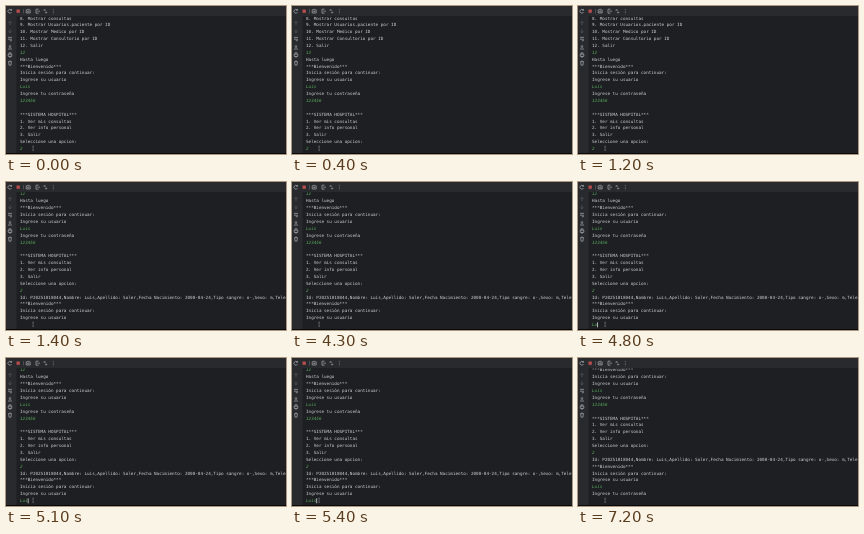
Write an HTML page that moves like this. It is 280x148 px and loops after 8 s.

```html
<!DOCTYPE html>
<html lang="es">
<head>
<meta charset="utf-8">
<title>Consola</title>
<style>
html, body { margin: 0; width: 100%; height: 100%; overflow: hidden; background: #1e1f22; }
svg { display: block; width: 280px; height: 148px; }
text { font: 4.29px "DejaVu Sans Mono", "Liberation Mono", monospace; fill: #cfd1d5; white-space: pre; text-rendering: geometricPrecision; }
.in { fill: #5aac5e; font-style: italic; }
.icon { fill: none; stroke: #a9acb2; stroke-width: .7; }
.dim { stroke: #5a5d63; }
</style>
</head>
<body>
<svg viewBox="0 0 280 148">
  <defs><clipPath id="pane"><rect x="11" y="10.5" width="269" height="136.5"/></clipPath></defs>
  <rect width="280" height="148" fill="#282a2e"/>
  <rect x="10.5" y="10" width="269.5" height="138" fill="#1e1f22"/>
  <g class="icon">
    <path d="M5.3 4A1.9 1.9 0 1 0 5.6 6M5.6 2.9V4.3H4.2"/>
    <rect x="10.9" y="3.9" width="2.6" height="2.6" fill="#b84d4d" stroke="#b84d4d"/>
    <path class="dim" d="M17.5 3V7.5"/>
    <path d="M20.2 3.9H21.2L21.7 3.2H22.7L23.2 3.9H24.2V7H20.2Z"/>
    <circle cx="22.2" cy="5.4" r=".6"/>
    <path d="M32.5 3.2H30V7.2H32.5M31.3 5.2H34"/>
    <path d="M37.5 4.2H39.5L38.5 3.2M39 6.3H41L40 7.3"/>
    <path d="M47.3 3.2V3.9M47.3 4.9V5.6M47.3 6.6V7.3"/>
    <path class="dim" d="M4 19V15.4M2.6 16.8L4 15.4L5.4 16.8"/>
    <path class="dim" d="M4 23.2V26.8M2.6 25.4L4 26.8L5.4 25.4"/>
    <path d="M2 31.4H6M2 33.2H5.2Q6.2 34 5.2 34.8H3.8"/>
    <path d="M2 43H6M4 38.8V41.6M2.8 40.4L4 41.6L5.2 40.4"/>
    <path d="M2.2 48.2H5.8V50.4H2.2ZM3 48V46.8H5V48M3 51H5"/>
    <path d="M2.2 55.6H5.8M2.7 56L3 59.2H5L5.3 56M3.4 54.9H4.6"/>
  </g>
  <g clip-path="url(#pane)"><g id="log"></g></g>
  <rect id="caret" y="140.3" width=".8" height="5" fill="#d6d8dc"/>
  <path d="M26.4 140.2H27.8M27.1 140.2V144.4M26.4 144.4H27.8" fill="none" stroke="#a2a4a9" stroke-width=".45"/>
  <rect y="147" width="280" height="1" fill="#08090a"/>
</svg>
<script>
const LOOP = 8000, LEFT = 14, TOP = 13.5, PITCH = 6.87, ADVANCE = 2.583, ROWS = 20;
const USER = "Luis";
const log = document.getElementById("log"), caret = document.getElementById("caret");

// A leading ">" marks what the user typed.
const login = ["***Bienvenido***", "Inicia sesión para continuar:", "Ingrese su usuario"];
const lines = [
  "8. Mostrar consultas",
  "9. Mostrar Usuarios.paciente por ID",
  "10. Mostrar Medico por ID",
  "11. Mostrar Consultorio por ID",
  "12. Salir",
  ">12",
  "Hasta luego",
  ...login,
  ">" + USER,
  "Ingrese tu contraseña",
  ">123456",
  "",
  "***SISTEMA HOSPITAL***",
  "1. Ver mis consultas",
  "2. Ver info personal",
  "3. Salir",
  "Seleccione una opcion:",
  ">2",
  "Id: P20251018044,Nombre: " + USER + ",Apellido: Soler,Fecha Nacimiento: 2000-04-24,Tipo sangre: o-,Sexo: m,Telefono: 555",
  ...login,
  ">" + USER,
  "Ingrese tu contraseña",
  ">"
];

// [time, first visible line, typed characters, caret shown]
const steps = [
  [0, 0, 1, false],
  [1400, 5, 0, false],
  [4400, 5, 1, false],
  [4800, 5, 2, true],
  [5100, 5, 3, true],
  [5200, 5, 4, false],
  [5400, 5, 4, true],
  [7200, 7, 0, false]
];

const rows = lines.map((line, i) => {
  const el = document.createElementNS("http://www.w3.org/2000/svg", "text");
  const typed = line[0] === ">";
  if (typed) el.setAttribute("class", "in");
  el.setAttribute("x", LEFT);
  el.setAttribute("y", TOP + i * PITCH);
  log.append(el);
  return { el, text: typed ? line.slice(1) : line };
});

let shown;
function draw(now) {
  const t = now % LOOP;
  const step = steps.findLast(s => s[0] <= t);
  if (step === shown) return;
  shown = step;
  const [, first, count, blink] = step;
  const last = first + ROWS - 1;
  log.setAttribute("transform", `translate(0 ${-first * PITCH})`);
  rows.forEach(({ el, text }, i) => {
    el.textContent = i < first || i > last ? "" : i === last ? text.slice(0, count) : text;
  });
  caret.setAttribute("x", LEFT + count * ADVANCE);
  caret.setAttribute("visibility", blink ? "visible" : "hidden");
}

const start = performance.now();
function tick() {
  draw(performance.now() - start);
  requestAnimationFrame(tick);
}
tick();
</script>
</body>
</html>
```
